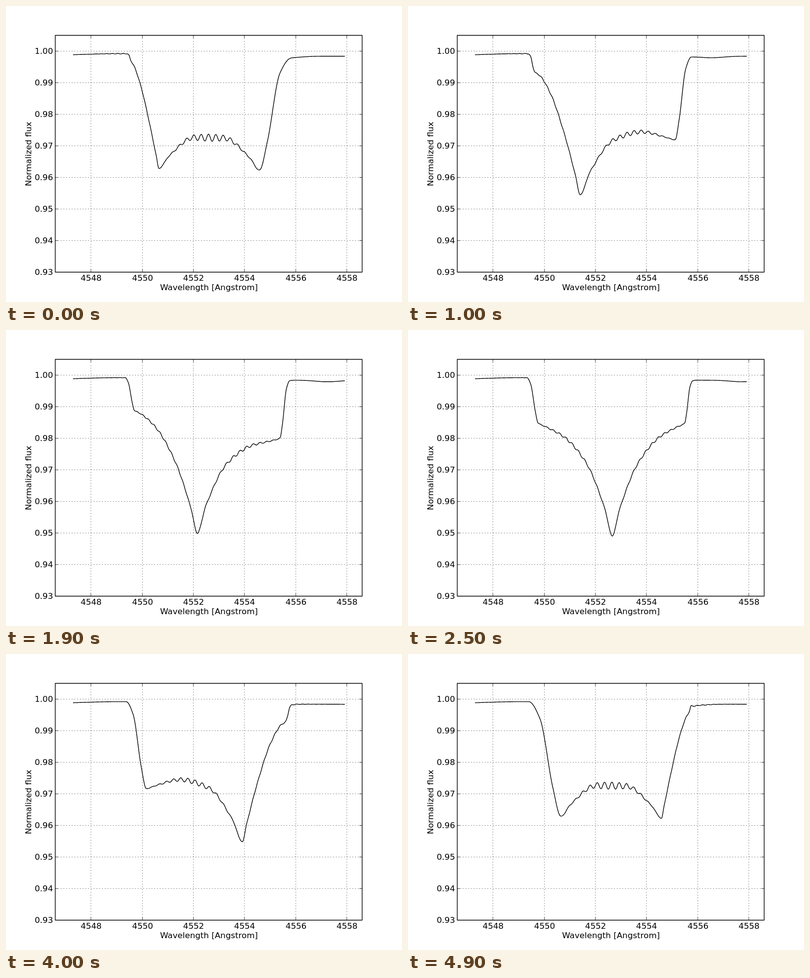
An HTML page that plays this animation: 800 px wide and 600 px high, repeating every 5 s.

```html
<!DOCTYPE html>
<html lang="en">
<head>
<meta charset="utf-8">
<title>Line profile</title>
<style>
  html, body { margin: 0; width: 100%; height: 100%; overflow: hidden; background: #fff; }
  svg { display: block; width: 800px; height: 600px; }
  text { font: 16.67px "DejaVu Sans", sans-serif; fill: #000; }
  path, rect { fill: none; stroke: #000; }
  #frame, #curve { stroke-width: 1.39; stroke-linejoin: round; }
  #grid, #ticks { stroke-width: 0.7; }
  #grid { stroke-dasharray: 1.39 4.17; }
</style>
</head>
<body>
<svg viewBox="0 0 800 600">
  <path id="grid"/>
  <path id="curve"/>
  <path id="ticks"/>
  <rect id="frame" x="99.5" y="59.5" width="620" height="480"/>
  <g id="labels"></g>
  <text x="410" y="576" text-anchor="middle">Wavelength [Angstrom]</text>
  <text transform="translate(51 300) rotate(-90)" text-anchor="middle">Normalized flux</text>
</svg>
<script>
const STEP = 100, STEPS = 50, CYCLE = 49;
const LEFT = 99.5, RIGHT = 719.5, TOP = 59.5, BOTTOM = 539.5, TICK = 5.56;
const MID = 410.5;
const PEAK = 1.5 * CYCLE;   // age at which a dip crosses the middle
const $ = id => document.getElementById(id);
const bell = (x, w) => Math.exp(-x * x / (w * w));

// Monotone cubic interpolation through [x, y] knots
function smooth(knots) {
  const n = knots.length;
  const d = knots.slice(1).map(([x, y], i) => (y - knots[i][1]) / (x - knots[i][0]));
  const m = knots.map((_, i) => {
    if (i === 0) return d[0];
    if (i === n - 1) return d[n - 2];
    const a = d[i - 1], b = d[i];
    return a * b <= 0 ? 0 : 2 * a * b / (a + b);
  });
  return x => {
    let i = 0;
    while (i < n - 2 && x > knots[i + 1][0]) i++;
    const [x0, y0] = knots[i], [x1, y1] = knots[i + 1];
    const h = x1 - x0, u = (x - x0) / h, v = 1 - u;
    return v * v * (1 + 2 * u) * y0 + u * u * (3 - 2 * u) * y1
      + h * u * v * (v * m[i] - u * m[i + 1]);
  };
}

// Continuum: across the line, left of it, right of it
const base = x => 96.3 + .018 * (x - 243);
const lead = x => 96.3 + 2.5 * Math.pow(Math.max(0, 240 - x) / 105, 1.5);
const tail = (x, k) => 101.7
  + 3.2 * (bell(x - 570 - 4.2 * k, 35) + bell(x - 570 - 4.2 * (k - CYCLE), 35));

// A dip drifts across the line, fast in the middle and slow at the rims
function dip(age) {
  const t = age - PEAK, z = 4.35 * t, reach = 158;
  return {
    age,
    x: MID + z / Math.pow(1 + (z / reach) ** 4, .25),
    depth: 318 * bell(t, 43.5)
  };
}

// Sagging, slightly skewed chord between two neighbouring dips
function between(a, b) {
  const t = a.age - CYCLE;
  const sag = 70 * Math.exp(-((t / 47) ** 4));
  const skew = -1.1 * Math.sin(Math.PI * t / 34);
  return [.1, .35, .65, .9].map(f => {
    const x = a.x + f * (b.x - a.x);
    const chord = a.depth + f * (b.depth - a.depth);
    return [x, base(x) + chord - sag * 4 * f * (1 - f) * (1 + skew * (f - .5))];
  });
}

// Soft step from a corner of the line down to its nearest dip
const edge = (corner, d) => [[.35, .15], [.75, .75]].map(([f, g]) => {
  const x = corner + f * (d.x - corner);
  return [x, base(x) + g * d.depth];
});

// Fine ripple that leaves the middle to the right and fades with age
function ripple(x, age) {
  const wave = 14.8 - .0035 * Math.min(age, 32) ** 2;
  const crest = 416.5 + 3.3 * age;
  return 7.2 * Math.exp(-age / 22) * bell(x - 412 - 3.1 * age, 58)
    * Math.cos(2 * Math.PI * (x - crest) / wave);
}

function profile(k) {
  const turn = 2 * Math.PI * k / CYCLE;
  const c1 = 242 + 2 * Math.cos(turn), c2 = 575.3 - 3 * Math.sin(turn);
  const [l, m, r] = [0, 1, 2].map(i => dip(k + i * CYCLE));
  const at = d => [d.x, base(d.x) + d.depth];
  const knots = [135, 160, 185, 210].map(x => [x, lead(x)]);
  knots.push([c1, 96.6], ...edge(c1, l), at(l), ...between(l, m), at(m),
    ...between(m, r), at(r), ...edge(c2, r).reverse(), [c2, tail(c2, k) + .8]);
  for (let x = 587; x <= 685; x += 14) knots.push([x, tail(x, k)]);
  const line = smooth(knots);
  return x => line(x) + ripple(x, k) + ripple(2 * MID - x, CYCLE - k);
}

function draw(k) {
  const y = profile(k), points = [];
  for (let x = 135.5; x < 685; x++) points.push(x + " " + y(x).toFixed(2));
  $("curve").setAttribute("d", "M" + points.join("L"));
}

function label(text, x, y, anchor) {
  const el = document.createElementNS("http://www.w3.org/2000/svg", "text");
  el.setAttribute("x", x);
  el.setAttribute("y", y);
  el.setAttribute("text-anchor", anchor);
  el.textContent = text;
  $("labels").append(el);
}

function axes() {
  let grid = "", ticks = "";
  for (let i = 0; i < 6; i++) {
    const x = Math.floor(171.8 + i * 103.33) + .5;
    grid += `M${x} ${BOTTOM}V${TOP}`;
    ticks += `M${x} ${BOTTOM}v${-TICK}M${x} ${TOP}v${TICK}`;
    label(4548 + 2 * i, x + .5, 557, "middle");
  }
  for (let i = 0; i < 8; i++) {
    const y = 91.5 + i * 64;
    if (i < 7) grid += `M${LEFT} ${y}H${RIGHT}`;
    ticks += `M${LEFT} ${y}h${TICK}M${RIGHT} ${y}h${-TICK}`;
    label((1 - i / 100).toFixed(2), 95, y + 5.5, "end");
  }
  $("grid").setAttribute("d", grid);
  $("ticks").setAttribute("d", ticks);
}

let shown = -1;
const start = performance.now();
function tick() {
  const k = Math.floor((performance.now() - start) / STEP) % STEPS;
  if (k !== shown) draw(shown = k);
  requestAnimationFrame(tick);
}
axes();
tick();
</script>
</body>
</html>
```
